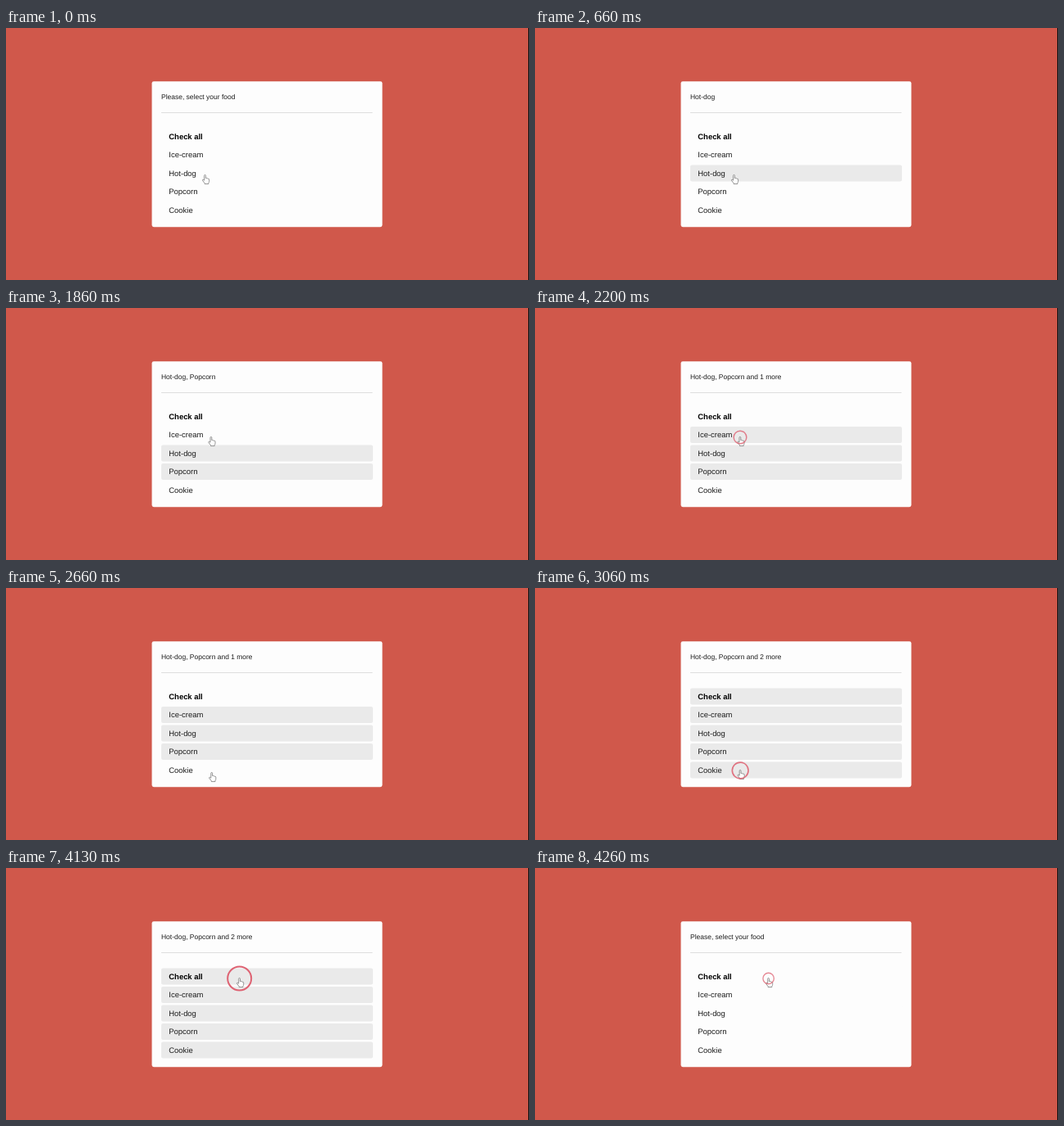
Recreate the animation shown at these times as an HTML page. Size 640 by 308 pixels, loop 4330 ms.

```html
<!DOCTYPE html>
<html lang="en">
<head>
<meta charset="utf-8">
<title>Food picker</title>
<style>
  html, body { margin: 0; width: 100%; height: 100%; overflow: hidden; background: #d0584b; }
  svg { display: block; width: 640px; height: 308px; }
  text {
    font: 9.45px "Liberation Sans", Arial, sans-serif;
    fill: #1c1c1c;
    text-rendering: geometricPrecision;
  }
  #summary { font-size: 8.47px; }
  .all { font-weight: bold; fill: #000; }
</style>
</head>
<body>
<svg viewBox="0 0 640 308">
  <rect width="640" height="308" fill="#d0584b"/>
  <rect x="639" width="1" height="308" fill="#111"/>
  <rect x="178.5" y="65.2" width="282" height="178" rx="2.4" fill="#fdfdfd"/>
  <text id="summary" x="190" y="86.8"></text>
  <rect x="190" y="103" width="258.5" height="1" fill="#dedede"/>
  <g id="list"></g>
  <g id="pointer">
    <path fill="#fff" stroke="#777" stroke-width=".8" stroke-linejoin="round"
      d="M-1 6.2V.4a.9 .9 0 0 1 1.8 0V3.6q.9-.6 1.5.3q.9-.5 1.4.4q1.3-.3 1.3 1V7.4q0 1.2-.8 2.1V10.6H-.5V9.7L-3 6.5q-.5-1.2.6-1.2z"/>
  </g>
  <circle id="ring" fill="none" stroke="#de6272"/>
</svg>
<script>
const LOOP = 4330;
const ITEMS = ["Check all", "Ice-cream", "Hot-dog", "Popcorn", "Cookie"];

// Times below count ticks of 1/15 s.
const START = [243.6, 180];
const MOVES = [
  { from: 12, to: 16, at: [247, 203] },
  { from: 23, to: 28, at: [251, 158] },
  { from: 35, to: 40, at: [251.8, 226] },
  { from: 42, to: 43, at: [251.2, 223] },
  { from: 56, to: 61, at: [285.7, 135] }
];
const CLICKS = [
  { tick: 3, item: 2, lead: 0 },
  { tick: 18, item: 3, lead: 0 },
  { tick: 32, item: 1, lead: 0.6 },
  { tick: 45, item: 4, lead: 0 },
  { tick: 62, item: 0, lead: 0 }
];

const $ = id => document.getElementById(id);
const summary = $("summary"), list = $("list"), pointer = $("pointer"), ring = $("ring");

function add(parent, tag, attrs) {
  const el = document.createElementNS("http://www.w3.org/2000/svg", tag);
  for (const key in attrs) el.setAttribute(key, attrs[key]);
  return parent.appendChild(el);
}

const rows = ITEMS.map((name, i) => {
  const y = 122.4 + i * 22.5;
  const row = add(list, "rect", { x: 190, y, width: 259, height: 20, rx: 2, fill: "#eaeaea" });
  add(list, "text", { x: 199.3, y: y + 13.2, class: i ? "" : "all" }).textContent = name;
  return row;
});

const ease = p => p * p * (3 - 2 * p);

function pointerAt(tick) {
  let [x, y] = START;
  for (const { from, to, at } of MOVES) {
    const p = ease(Math.min(1, Math.max(0, (tick - from) / (to - from))));
    x += (at[0] - x) * p;
    y += (at[1] - y) * p;
  }
  return [x, y];
}

function picksAt(tick) {
  let picks = [];
  for (const c of CLICKS) {
    if (tick <= c.tick) break;
    picks = c.item ? [...picks, c.item] : [];
  }
  return picks;
}

function describe(picks) {
  if (!picks.length) return "Please, select your food";
  const names = picks.slice(0, 2).map(i => ITEMS[i]).join(", ");
  return picks.length > 2 ? `${names} and ${picks.length - 2} more` : names;
}

function drawRing(tick, x, y) {
  const click = CLICKS.find(c => tick >= c.tick && tick - c.tick + c.lead < 2.5);
  ring.style.display = click ? "" : "none";
  if (!click) return;
  const age = tick - click.tick + click.lead;
  const width = 2 - 0.35 * age;
  ring.setAttribute("cx", x);
  ring.setAttribute("cy", y);
  ring.setAttribute("r", 15.5 * 0.69 ** age - width / 2);
  ring.setAttribute("stroke-width", width);
  ring.setAttribute("opacity", 1 - 0.12 * age);
}

function draw(ms) {
  // Ticks begin on whole hundredths of a second.
  const tick = Math.ceil((Math.floor(ms / 10) + 1) * 3 / 20) - 1;
  const picks = picksAt(tick);
  const [x, y] = pointerAt(tick);
  const full = picks.length === ITEMS.length - 1;
  rows.forEach((row, i) => {
    row.style.display = (i ? picks.includes(i) : full) ? "" : "none";
  });
  summary.textContent = describe(picks);
  pointer.setAttribute("transform", `translate(${x} ${y})`);
  drawRing(tick, x, y);
}

const begin = performance.now();
function frame() {
  draw((performance.now() - begin) % LOOP);
  requestAnimationFrame(frame);
}
frame();
</script>
</body>
</html>
```
